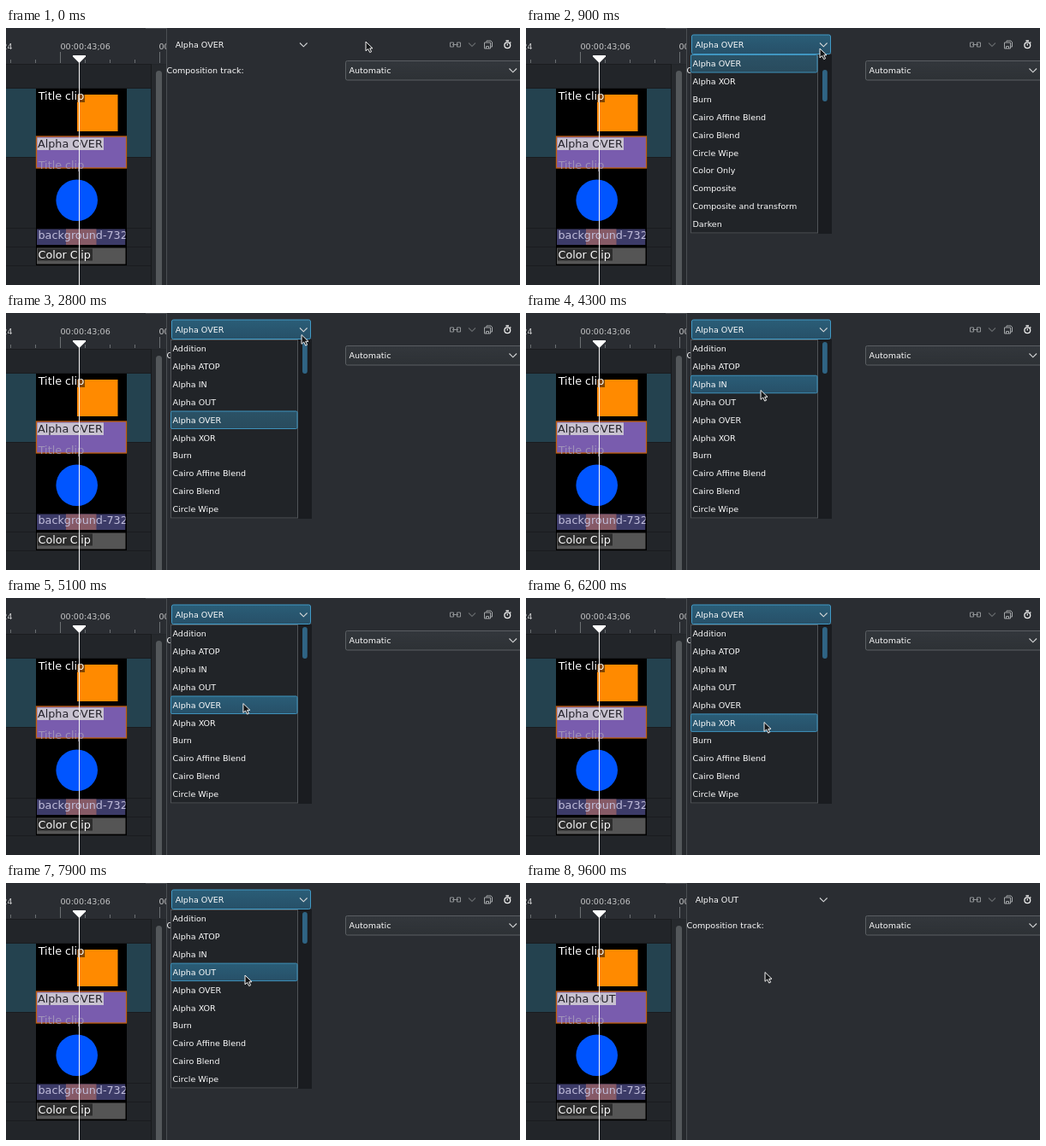
Recreate the animation shown at these times as an HTML page. Size 600 by 301 pixels, loop 9800 ms.

```html
<!DOCTYPE html>
<html lang="en">
<head>
<meta charset="utf-8">
<title>Choosing a composition</title>
<style>
html, body { margin: 0; width: 100%; height: 100%; overflow: hidden; background: #2a2d32; }
svg { display: block; width: 600px; height: 301px; }
text { font: 9.55px "DejaVu Sans", sans-serif; fill: #fcfcfc; white-space: pre; }
.clip { font-size: 12.75px; }
.time { fill: #c9cacb; }
.line { fill: none; stroke: #d5d7d8; stroke-width: 1.1; }
.dim { stroke: #64686b; }
</style>
</head>
<body>
<svg viewBox="0 0 600 301">
  <defs>
    <linearGradient id="blue" x2="0" y2="1">
      <stop stop-color="#2a5d77"/><stop offset="1" stop-color="#275068"/>
    </linearGradient>
    <linearGradient id="pale" x2="0" y2="1">
      <stop stop-color="#2b5266"/><stop offset="1" stop-color="#294b5d"/>
    </linearGradient>
    <linearGradient id="grey" x2="0" y2="1">
      <stop stop-color="#33373c"/><stop offset="1" stop-color="#2d3135"/>
    </linearGradient>
    <clipPath id="lane"><rect x="36" y="235" width="103.5" height="20"/></clipPath>
    <clipPath id="ruler"><rect width="187" height="43"/></clipPath>
  </defs>

  <!-- timeline -->
  <rect width="187" height="301" fill="#222529"/>
  <rect width="187" height="42" fill="#2a2d32"/>
  <path d="M163 .5H187" stroke="#4a4e52"/>
  <path d="M0 42.5H170" stroke="#1b1d20"/>
  <g clip-path="url(#ruler)">
    <text class="time" x="-4.5" y="24.5">24</text>
    <text class="time" x="63.5" y="24.5">00:00:43;06</text>
    <text class="time" x="178.5" y="24.5">00:00:45</text>
    <path id="ticks" stroke="#6c7073"/>
  </g>
  <path d="M0 70.5H169M0 151.5H169M0 234.5H169M0 256.5H169M0 278.5H169" stroke="#1a1c1f"/>
  <rect y="71" width="169" height="80" fill="#24424f"/>
  <rect x="169" y="43" width="18" height="258" fill="#26292d"/>
  <path d="M169.5 43V301" stroke="#17191b"/>
  <rect x="175" y="50" width="7" height="256" rx="3.5" fill="#54585b"/>
  <path d="M187.5 0V301" stroke="#4a4e52"/>

  <!-- clips -->
  <rect x="35" y="71" width="106" height="207" fill="#000"/>
  <rect x="83" y="78" width="47.5" height="43" fill="#ff8a00"/>
  <rect x="37" y="73" width="55" height="14" fill="#000" opacity=".5"/>
  <text class="clip" x="37.7" y="84">Title clip</text>
  <rect x="35.5" y="127" width="105" height="37" fill="#795cae" stroke="#c05e0c" stroke-width="1.3"/>
  <rect id="tag" x="36.5" y="128.5" height="14.5" fill="#c8c2d0"/>
  <text id="tagText" class="clip" x="37" y="140" style="fill:#25222b"></text>
  <text class="clip" x="37.7" y="165.3" style="fill:#a69bbb" opacity=".85">Title clip</text>
  <circle cx="82.7" cy="201.7" r="24.3" fill="#0055ff"/>
  <g clip-path="url(#lane)">
    <rect x="36" y="235.5" width="103.5" height="18.5" fill="#3c3b68"/>
    <rect x="70" y="235.5" width="35.5" height="18.5" fill="#865a66"/>
    <text class="clip" x="37.5" y="246.8" style="fill:#c0bddb">background-732</text>
  </g>
  <rect x="36" y="257.5" width="103.5" height="19" fill="#555"/>
  <rect x="37" y="258.5" width="64" height="14" fill="#1c1c1c" opacity=".7"/>
  <text class="clip" x="37.5" y="269.5">Color Clip</text>
  <path d="M85.5 39V301" stroke="#f4f4f4"/>
  <path d="M78 32H93V33.5L85.5 41 78 33.5Z" fill="#fff"/>

  <!-- properties -->
  <rect id="combo" x="193.5" y="8" width="162" height="22.5" rx="2" fill="url(#blue)" stroke="#419ac6"/>
  <text id="comboText" x="197.7" y="22.7"></text>
  <path class="line" d="M343 17.5L347.3 21.8 351.6 17.5"/>
  <g class="line">
    <path d="M518.5 17H522.5V22H518.5ZM526.5 17H530.5V22H526.5ZM521 19.5H528" stroke="#8f9295" stroke-width="1"/>
    <path class="dim" d="M540 17.5L544 21.5 548 17.5"/>
    <path d="M561 16.500V15H566L567.500 16.500V22H566M558.500 17H565.500V24H558.500ZM560.500 24V21.500H563.500V24" stroke="#a3a6a8" stroke-width="1"/>
    <g stroke="#f0f0f0" stroke-width="1.300">
      <circle cx="585.300" cy="20.300" r="3.400"/>
      <path d="M583.500 15H587M585.300 18.500V20.500M588.300 16.500L589.300 17.500"/>
    </g>
  </g>
  <text x="187.500" y="53">Composition track:</text>
  <rect x="396.500" y="38.500" width="212" height="22.500" rx="2" fill="url(#grey)" stroke="#5a5e62"/>
  <text x="400.500" y="53">Automatic</text>
  <path class="line" d="M587.500 47.500L591.800 51.800 596.100 47.500"/>

  <!-- drop-down -->
  <g id="popup">
    <rect x="192" y="31" width="165" height="210" fill="#1a1c20"/>
    <rect x="192.500" y="31.500" width="148" height="208.500" fill="#212428" stroke="#505458"/>
    <rect id="row" x="192.500" width="147.500" height="20.500" rx="1.500" stroke="#3f93bd"/>
    <rect id="thumb" x="346" width="5.800" height="37" rx="2.900" fill="#2f6484"/>
    <g id="list"></g>
  </g>

  <path id="cursor" d="M0 0V10.800L2.700 8.500 4.700 12.600 6.600 11.700 4.700 7.800H8Z" fill="#141618" stroke="#f2f2f2" stroke-linejoin="round"/>
</svg>
<script>
const LOOP = 9800, STEP = 100, ROWS = 10, PITCH = 20.88, TOP = 31.5;
const OPEN = 700, PICK = 8700, OVER = 4, OUT = 3;
const items = ["Addition", "Alpha ATOP", "Alpha IN", "Alpha OUT", "Alpha OVER", "Alpha XOR", "Burn",
  "Cairo Affine Blend", "Cairo Blend", "Circle Wipe", "Color Only", "Composite",
  "Composite and transform", "Darken"];

// time, x, y of the pointer tip
const path = [
  [0, 420, 16], [600, 343, 23.5], [900, 343, 24], [1200, 345, 25.5], [1400, 345, 25.5],
  [1700, 348, 60], [2300, 348, 44], [2600, 345, 25.5], [2800, 345, 25.5],
  [3300, 304, 62], [3600, 278, 66], [4200, 274, 90.5], [4400, 274, 90.5],
  [5200, 277, 125], [5500, 278, 128], [6200, 278, 145.5], [6700, 278, 145.5],
  [7600, 279, 108], [8700, 279, 108], [9200, 279, 104.5], [LOOP, 279, 104.5]
];
// time, first visible item
const scroll = [[0, 4], [1800, 3], [1900, 2], [2100, 1], [2300, 0]];

const $ = id => document.getElementById(id);
const set = (el, attrs) => { for (const k in attrs) el.setAttribute(k, attrs[k]); };
const show = (el, on) => { el.style.display = on ? "" : "none"; };
const write = (el, s) => { if (el.textContent !== s) el.textContent = s; };

function pointer(t) {
  const i = path.findIndex(p => p[0] > t);
  const [t0, x0, y0] = path[i - 1], [t1, x1, y1] = path[i];
  const u = (t - t0) / (t1 - t0), e = u * u * (3 - 2 * u);
  return [x0 + (x1 - x0) * e, y0 + (y1 - y0) * e];
}

const labels = Array.from({ length: ROWS }, (_, i) => {
  const el = document.createElementNS("http://www.w3.org/2000/svg", "text");
  set(el, { x: 194.5, y: 45.2 + i * PITCH });
  return $("list").appendChild(el);
});

let ticks = "";
for (let i = -2; i < 5; i++) ticks += `M${Math.round(63 + i * 28.9) + .5} ${i % 4 ? 37 : 28}V41`;
set($("ticks"), { d: ticks });

function draw(t) {
  const open = t >= OPEN && t < PICK;
  const name = items[t < PICK ? OVER : OUT];
  const [x, y] = pointer(t);
  const first = scroll.filter(s => s[0] <= t).pop()[1];
  const hover = t > 2800 && x < 340 && y > TOP;
  const row = hover ? Math.floor((y - TOP) / PITCH) : OVER - first;

  set($("cursor"), { transform: `translate(${x} ${y})` });
  show($("popup"), open);
  show($("combo"), open || (x < 356 && y < 31));
  write($("comboText"), name);
  write($("tagText"), name);
  set($("tag"), { width: t < PICK ? 77.5 : 68.5 });
  labels.forEach((el, i) => write(el, items[first + i]));
  set($("row"), { y: TOP + row * PITCH, fill: hover ? "url(#blue)" : "url(#pale)" });
  set($("thumb"), { y: 34 + first * 3.75 });
}

function tick(now) {
  draw(Math.floor(now % LOOP / STEP) * STEP);
  requestAnimationFrame(tick);
}
draw(0);
requestAnimationFrame(tick);
</script>
</body>
</html>
```
